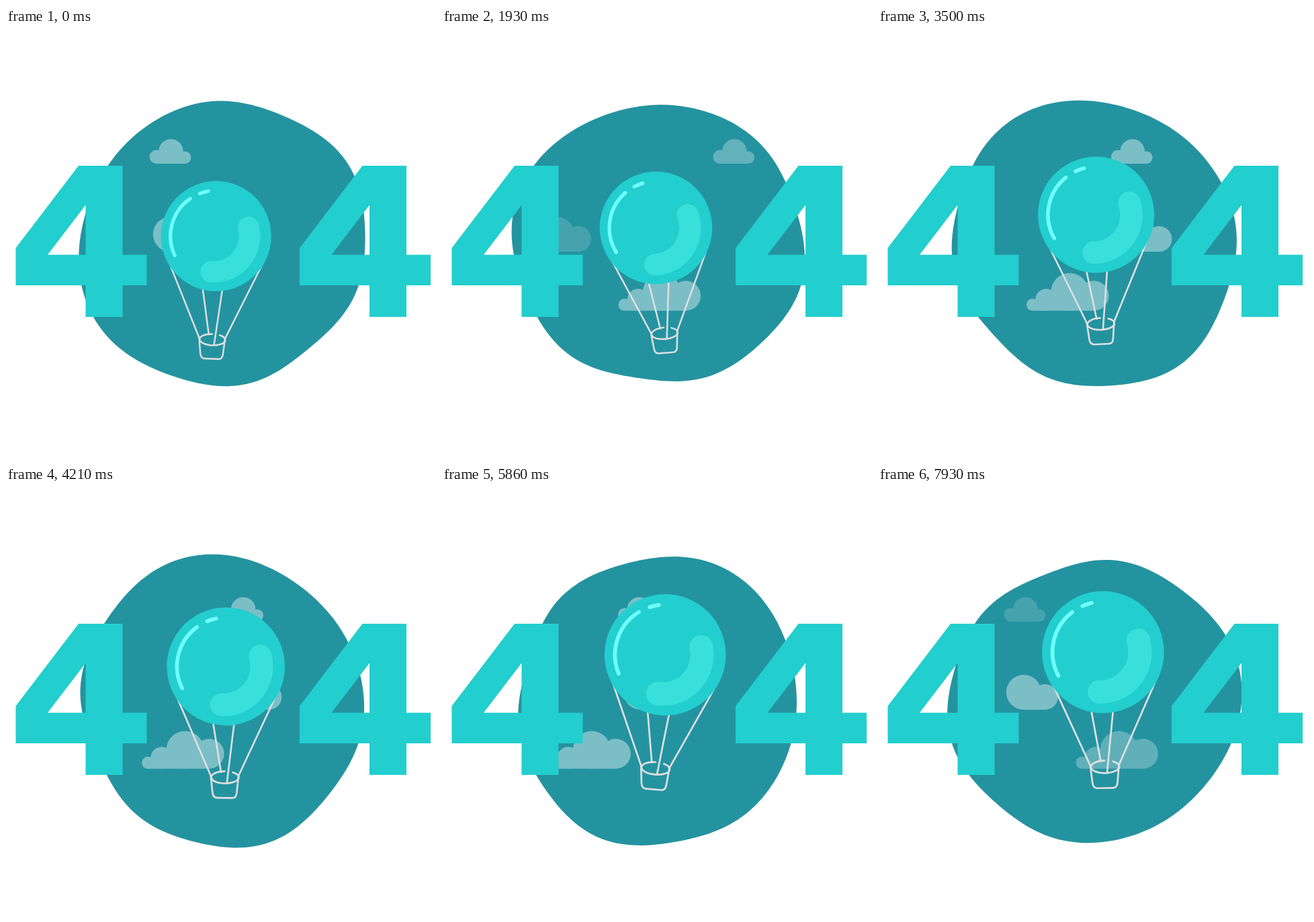
An HTML page that plays this animation: 640 px wide and 640 px high, repeating every 8 s.

```html
<!DOCTYPE html>
<html lang="en">
<head>
<meta charset="utf-8">
<title>404</title>
<style>
  html, body { margin: 0; width: 100%; height: 100%; overflow: hidden; background: #fff; }
  svg { display: block; width: 100%; height: 100%; }
  .line { fill: none; stroke: #e0e0e0; stroke-width: 2.6; stroke-linecap: round; stroke-linejoin: round; }
  .shine { fill: none; stroke: #6ffdfd; stroke-width: 5.6; stroke-linecap: round; }
  .shade { fill: none; stroke: #39dfda; stroke-width: 34; stroke-linecap: round; }
</style>
</head>
<body>
<svg viewBox="0 0 640 640">
  <path id="blob" fill="#2493a0"/>
  <g id="clouds" fill="#fff"></g>
  <g id="balloon">
    <g class="line">
      <path d="M-73 45L-21 163M74 45L20 163M-20 74L-6 157M14 76L3 173"/>
      <path d="M11.5 157.5A20.5 9 0 1 1-.5 156"/>
      <path d="M-21 164L-18.3 188Q-17.3 195.6-11 195.6H11Q17 195.6 17.7 188L20 164"/>
    </g>
    <circle r="87.8" fill="#23cece"/>
    <path class="shade" d="M51-16A57 57 0 0 1-6 57"/>
    <path id="shine" class="shine"/>
  </g>
  <g fill="#23cece" fill-rule="evenodd">
    <path id="four" d="M108 205H173.5V337.5H209.5V383H173.5V430H118.5V383H14.5V327.5ZM118.5 263.5V337.5H62Z"/>
    <use href="#four" x="422.5"/>
  </g>
</svg>
<script>
const $ = id => document.getElementById(id);
const TAU = 2 * Math.PI;
const rad = deg => deg * Math.PI / 180;
const polar = (r, deg) => [r * Math.cos(rad(deg)), r * Math.sin(rad(deg))];
const clamp = v => Math.max(0, Math.min(1, v));

// The blob is a circle with a few waves around its edge
const waves = [
  { count: 2, size: 5.9, phase: -73 },
  { count: 3, size: 0.95, phase: 25 },
  { count: 4, size: 2.3, phase: -80 },
  { count: 5, size: 1, phase: 99 },
  { count: 6, size: 1.95, phase: 145 },
  { count: 7, size: 0.8, phase: 153 }
];
const blobRadius = deg => waves.reduce(
  (r, { count, size, phase }) => r + size * Math.cos(rad(count * deg - phase)), 212);
const edge = Array.from({ length: 180 }, (_, i) => polar(blobRadius(2 * i), 2 * i));
$('blob').setAttribute('d', `M${edge.join('L')}Z`);

const shineArc = (from, to) => `M${polar(72.7, from)}A72.7 72.7 0 0 1 ${polar(72.7, to)}`;
$('shine').setAttribute('d', shineArc(153, 233.4) + shineArc(247, 258));

// Puffs are [x, radius]; all of them rest on the floor of their cloud
const CLOUD_PERIOD = 7.2, FADE = 1.1;
const clouds = [
  { start: 1.15, x: 431.6, speed: 36, floor: 202, puffs: [[10.3, 10.3], [31.7, 18.3], [52.3, 9.3]] },
  { start: 2.35, x: 404.6, speed: 38.3, floor: 333, puffs: [[26, 26], [58, 19]] },
  { start: 0, x: 313.7, speed: 26.5, floor: 420.8, puffs: [[9, 9], [29.5, 16.3], [64.5, 28], [100.3, 22.3]] }
];

function cloudShape({ floor, puffs }) {
  return puffs.map(([x, r], i) => {
    const [nextX, nextR] = puffs[i + 1] || [x, r];
    const height = Math.min(r, nextR);
    return `<circle cx="${x}" cy="${floor - r}" r="${r}"/>` +
      `<rect x="${x}" y="${floor - height}" width="${nextX - x}" height="${height}"/>`;
  }).join('');
}
$('clouds').innerHTML = clouds.map(cloud => `<g>${cloudShape(cloud)}</g>`).join('');

function draw(t) {
  $('blob').setAttribute('transform', `translate(322 320.6) rotate(${25 * t})`);

  clouds.forEach(({ start, x, speed }, i) => {
    const age = (t - start + CLOUD_PERIOD) % CLOUD_PERIOD;
    const node = $('clouds').children[i];
    node.setAttribute('transform', `translate(${x - speed * age} 0)`);
    node.setAttribute('opacity', 0.4 * clamp(Math.min(age, CLOUD_PERIOD - age) / FADE));
  });

  // The balloon rises and grows while it sways
  const low = Math.cos(TAU * (t + 0.25) / 15);
  const sway = -4.9 * Math.sin(TAU * (t - 0.5) / 7.2);
  $('balloon').setAttribute('transform',
    `translate(${324.1 - 11 * low} ${278 + 32 * low}) rotate(${sway} 0 -13) scale(${(86.5 - 4.5 * low) / 87.8})`);
}

function tick() {
  draw(performance.now() % 8000 / 1000);
  requestAnimationFrame(tick);
}
tick();
</script>
</body>
</html>
```
